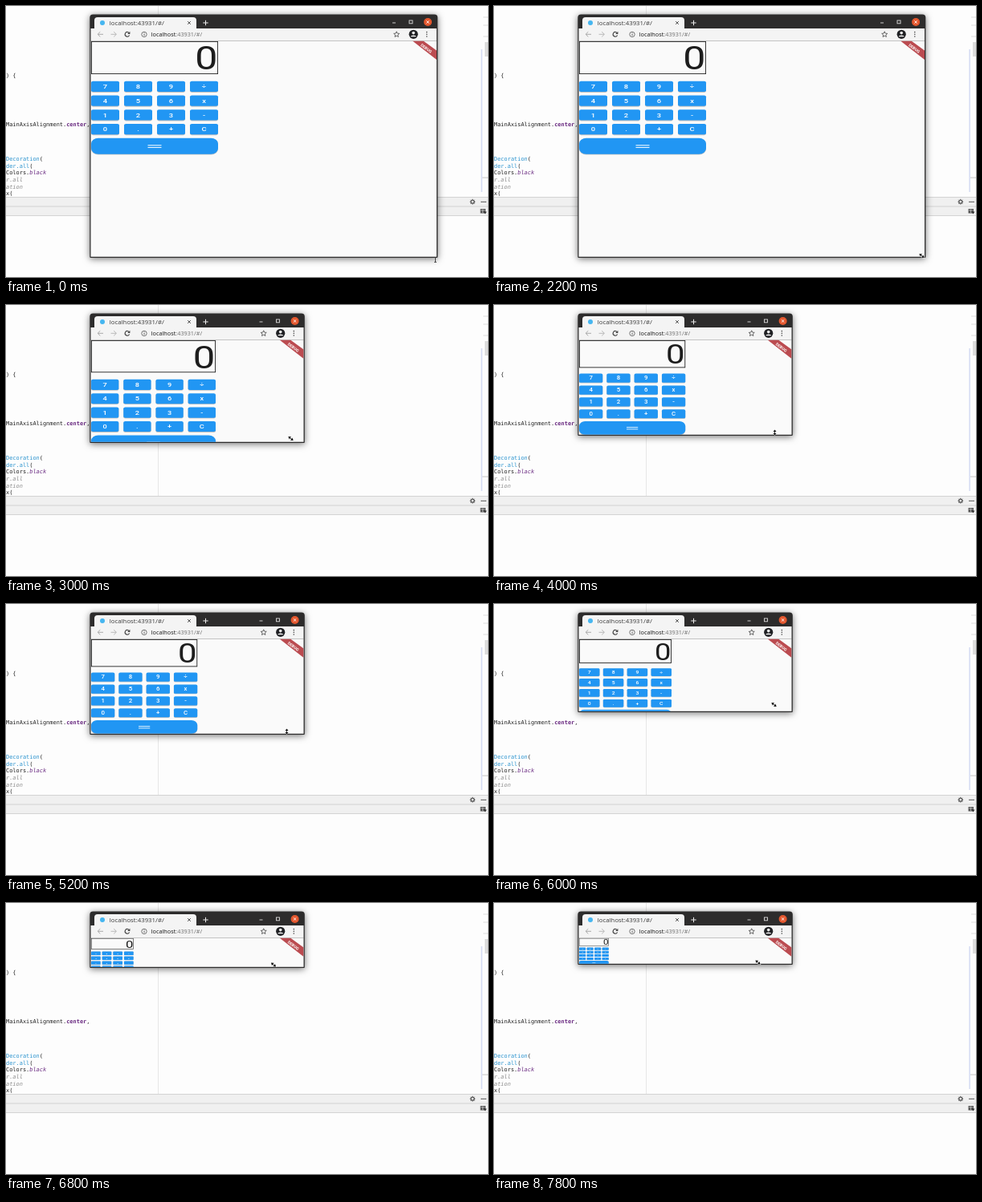
Recreate the animation shown at these times as an HTML page with a canvas. Size 600 px wide and 338 px high, loop 8000 ms.

```html
<!DOCTYPE html>
<html lang="en">
<head>
<meta charset="utf-8">
<title>Resizing a calculator window</title>
<style>
  html, body { margin: 0; width: 100%; height: 100%; overflow: hidden; background: #fdfdfd; }
  canvas { display: block; width: 100vw; height: 100vh; }
</style>
</head>
<body>
<canvas id="stage"></canvas>
<script>
const W = 600, H = 338, LOOP = 8000, STEP = 200;
const LEFT = 105, TOP = 11, BODY_TOP = 44;
const MONO = '"DejaVu Sans Mono", monospace';
const SANS = '"Noto Sans", "Open Sans", sans-serif';
const APP = 'Roboto, sans-serif';

// time, window right, window bottom, pointer x, pointer y
const KEYS = [
  [0, 537, 314, 534.5, 316.5],
  [800, 537, 314, 533, 313],
  [1200, 537, 314, 533, 313],
  [1800, 537, 314, 532.5, 311.5],
  [2200, 537, 314, 532.5, 311.5],
  [2400, 500, 284, 495, 281],
  [2600, 447, 234, 440, 230],
  [2800, 395, 183.3, 390, 179],
  [3000, 371.5, 172, 354.5, 166.5],
  [3200, 371.5, 165, 351, 161],
  [3400, 371.5, 163, 349.5, 159],
  [5600, 371.5, 163, 349.5, 159],
  [5800, 371.5, 147.6, 349, 140],
  [6000, 371.5, 135, 348.5, 125.5],
  [6600, 371.5, 92, 336, 85],
  [6800, 371.5, 81, 333, 77],
  [7800, 371.5, 77, 328.5, 74],
  [8000, 371.5, 77, 328.5, 74]
];
const POINTERS = [[0, 'beam'], [800, 'diagonal'], [3400, 'vertical'], [5600, 'diagonal']];
const LABELS = ['789÷', '456x', '123-', '0.+C'];

const canvas = document.getElementById('stage');
const ctx = canvas.getContext('2d');
const ratio = window.devicePixelRatio || 1;
canvas.width = W * ratio;
canvas.height = H * ratio;

function pose(t) {
  const i = Math.max(1, KEYS.findIndex(k => k[0] >= t));
  const a = KEYS[i - 1], b = KEYS[i];
  const p = (t - a[0]) / (b[0] - a[0]);
  const [, right, bottom, x, y] = a.map((v, n) => v + (b[n] - v) * p);
  return { right, bottom, x, y };
}

function rect(x, y, w, h, fill) {
  ctx.fillStyle = fill;
  ctx.fillRect(x, y, w, h);
}

function round(x, y, w, h, r, fill) {
  ctx.fillStyle = fill;
  ctx.beginPath();
  ctx.roundRect(x, y, w, h, r);
  ctx.fill();
}

function disc(x, y, r, fill) {
  ctx.fillStyle = fill;
  ctx.beginPath();
  ctx.arc(x, y, r, 0, 7);
  ctx.fill();
}

function ring(x, y, r, color, width = 0.9, from = 0, to = 7) {
  ctx.strokeStyle = color;
  ctx.lineWidth = width;
  ctx.beginPath();
  ctx.arc(x, y, r, from, to);
  ctx.stroke();
}

function line(points, color, width = 0.9) {
  ctx.strokeStyle = color;
  ctx.lineWidth = width;
  ctx.beginPath();
  points.forEach(([x, y]) => ctx.lineTo(x, y));
  ctx.stroke();
}

function poly(points, fill) {
  ctx.fillStyle = fill;
  ctx.beginPath();
  points.forEach(([x, y]) => ctx.lineTo(x, y));
  ctx.fill();
}

function cross(x, y, r, color, width) {
  line([[x - r, y - r], [x + r, y + r]], color, width);
  line([[x - r, y + r], [x + r, y - r]], color, width);
}

function text(str, x, y, font, color, align = 'left') {
  ctx.font = font;
  ctx.fillStyle = color;
  ctx.textAlign = align;
  ctx.fillText(str, x, y);
  return x + ctx.measureText(str).width;
}

function drawEditor() {
  rect(0, 0, W, H, '#fdfdfd');
  rect(189, 0, 1, 238, '#e6e6e6');

  const plain = '6.95px ' + MONO;
  const bold = 'bold ' + plain, italic = 'italic ' + plain;
  const ink = '#222', blue = '#2a93cf', purple = '#6b2c82', grey = '#8c8c8c';
  text(') {', 0, 89, plain, ink);
  let x = text('MainAxisAlignment.', 0, 149.7, plain, ink);
  x = text('center', x, 149.7, bold, purple);
  text(',', x, 149.7, plain, ink);
  x = text('Decoration', 0, 193, plain, blue);
  text('(', x, 193, plain, ink);
  x = text('der.all', 0, 201.6, plain, blue);
  text('(', x, 201.6, plain, ink);
  x = text('Colors.', 0, 210.3, plain, ink);
  text('black', x, 210.3, italic, purple);
  text('r.all', 0, 219, italic, grey);
  text('ation', 0, 227.6, italic, grey);
  text('x(', 0, 236.3, plain, ink);

  rect(591.5, 54, 1.2, 178, '#c9d2f0');
  rect(596, 45, 4, 18, '#dcdcdc');
  [14, 24, 38].forEach(y => rect(594, y - 0.5, 6, 1, '#dedede'));
  rect(593, 213.5, 7, 1.2, '#cfcfcf');

  rect(0, 238, W, 24, '#f0f0f0');
  [238, 249.5, 261].forEach(y => rect(0, y, W, 1, '#d3d3d3'));
  ring(580.8, 244.2, 2, '#555', 1.3);
  for (let a = 0; a < 6.2; a += Math.PI / 4) {
    const c = Math.cos(a), s = Math.sin(a);
    line([[580.8 + c * 2.3, 244.2 + s * 2.3], [580.8 + c * 3.4, 244.2 + s * 3.4]], '#555', 1);
  }
  rect(591, 243.8, 7, 1, '#555');
  rect(590.5, 253, 6.5, 5.5, '#555');
  rect(591, 254.6, 5.5, 0.6, '#ddd');
  rect(593.4, 253.6, 0.6, 4.5, '#ddd');
  poly([[594.5, 256.5], [598.5, 256.5], [596.5, 259.5]], '#333');
}

function drawFrame(right, bottom) {
  ctx.save();
  ctx.shadowColor = 'rgba(0,0,0,.55)';
  ctx.shadowBlur = 8 * ratio;
  ctx.shadowOffsetY = 1.5 * ratio;
  round(LEFT - 0.7, TOP - 0.5, right - LEFT + 1, bottom - TOP + 0.5, [4, 4, 1, 1], '#2d2c2c');
  ctx.restore();

  // tab strip
  round(110, 14, 127, 16, [4, 4, 0, 0], '#f4f4f4');
  disc(120, 21, 3, '#46b6f0');
  text('localhost:43931/#/', 128.7, 23.6, '7.8px ' + SANS, '#444');
  cross(228, 21, 1.9, '#444', 0.9);
  line([[245.3, 21], [251.7, 21]], '#eee', 1);
  line([[248.5, 17.8], [248.5, 24.2]], '#eee', 1);

  line([[right - 56, 21], [right - 52, 21]], '#ddd', 0.9);
  ctx.strokeStyle = '#ddd';
  ctx.lineWidth = 0.9;
  ctx.strokeRect(right - 35, 18, 4, 3.8);
  disc(right - 11.9, 20, 5, '#e4572e');
  cross(right - 11.9, 20, 1.7, '#fff', 0.9);

  // address bar
  rect(LEFT + 0.5, 28, right - LEFT - 1.5, 15.5, '#f4f4f4');
  const arrow = (x, dir, color) => {
    line([[x - dir * 3.5, 35.3], [x + dir * 3.2, 35.3]], color, 1);
    line([[x + dir * 0.2, 32.2], [x + dir * 3.4, 35.3], [x + dir * 0.2, 38.4]], color, 1);
  };
  arrow(117.5, -1, '#a9a9a9');
  arrow(134, 1, '#b9b9b9');
  ring(151, 35.3, 2.8, '#444', 1.1, 0.4, 5.6);
  poly([[154.4, 31.8], [154.4, 35], [151.2, 35]], '#444');
  ring(172, 35.4, 3.2, '#555', 0.8);
  rect(171.6, 34.9, 0.9, 2.2, '#555');
  rect(171.6, 33.4, 0.9, 0.9, '#555');
  const x = text('localhost', 180.7, 38, '7.25px ' + SANS, '#222');
  text(':43931/#/', x, 38, '7.25px ' + SANS, '#777');

  const star = [...Array(11).keys()].map(i => {
    const a = i * Math.PI / 5 - Math.PI / 2, r = i % 2 ? 1.7 : 3.7;
    return [right - 50.8 + Math.cos(a) * r, 35.5 + Math.sin(a) * r];
  });
  line(star, '#444', 0.8);
  const face = right - 29.8;
  disc(face, 35.3, 5.6, '#202124');
  disc(face, 33.6, 1.8, '#f4f4f4');
  ctx.beginPath();
  ctx.ellipse(face, 38.2, 3.3, 1.6, 0, Math.PI, 0);
  ctx.fill();
  [32.6, 35.3, 38].forEach(y => disc(right - 13.2, y, 0.8, '#444'));
}

// The calculator is laid out at full size and scaled as a whole;
// the recording is wider than the app's true proportions.
function drawCalculator(scale) {
  const wide = 1.25, w = 158 / wide;
  ctx.save();
  ctx.translate(LEFT + 1, BODY_TOP);
  ctx.scale(scale * wide, scale);

  rect(0, 0, w, 41, '#222');
  const edge = Math.min(1.6, 0.9 / scale);
  rect(edge / wide, edge, w - 2 * edge / wide, 41 - 2 * edge, '#fafafa');
  text('0', w - 0.6, 35.2, '40px ' + APP, '#1d1d1d', 'right');

  const key = (x, y, kw, kh, r) => {
    round(x, y + 0.8, kw, kh, r, 'rgba(0,0,0,.22)');
    round(x, y, kw, kh, r, '#2196f3');
  };
  LABELS.forEach((row, r) => [...row].forEach((label, c) => {
    const x = c * 41 / wide, y = 49.7 + r * 17.75;
    key(x, y, 35 / wide, 13.4, 1.8);
    text(label, x + 17.5 / wide, y + 9.4, '500 7.5px ' + APP, '#fff', 'center');
  }));
  key(0, 120.7, w, 20, 7);
  [129.2, 131.9].forEach(y => rect(70.5 / wide, y, 17 / wide, 1.1, '#e8f4fe'));
  ctx.restore();
}

function drawBanner(right) {
  const e = right - 1;
  poly([[e - 30, 43.5], [e - 16.5, 43.5], [e, 55.5], [e, 67]], '#bb4b50');
  ctx.save();
  ctx.translate(e - 12.8, 52.8);
  ctx.rotate(Math.atan(0.75));
  text('DEBUG', 0, 1.8, 'bold 5px ' + APP, '#fff', 'center');
  ctx.restore();
}

function drawPointer(kind, x, y) {
  ctx.save();
  ctx.translate(x, y);
  if (kind === 'beam') {
    line([[0, -3], [0, 3]], '#333', 0.9);
    line([[-1.5, -3], [1.5, -3]], '#333', 0.8);
    line([[-1.5, 3], [1.5, 3]], '#333', 0.8);
  } else {
    if (kind === 'diagonal') ctx.rotate(-0.9);
    const reach = kind === 'diagonal' ? 4 : 3.4;
    [1, -1].forEach(d => {
      const head = [[-2, d * 0.9], [2, d * 0.9], [0, d * reach], [-2, d * 0.9]];
      line(head, '#fff', 1);
      poly(head, '#111');
    });
    line([[0, -1], [0, 1]], '#111', 0.9);
  }
  ctx.restore();
}

function draw(time) {
  const t = Math.floor(time % LOOP / STEP) * STEP;
  const now = pose(t);
  // layout trails the window edge by one step
  const before = pose(Math.max(0, t - STEP));
  const scale = Math.min(1, (before.bottom - 45) / 141);

  ctx.setTransform(ratio, 0, 0, ratio, 0, 0);
  drawEditor();
  drawFrame(now.right, now.bottom);

  ctx.save();
  ctx.beginPath();
  ctx.rect(LEFT + 0.5, 43.5, now.right - LEFT - 1.5, now.bottom - 44.7);
  ctx.clip();
  rect(LEFT, 43, now.right - LEFT, now.bottom - 43, '#fafafa');
  drawCalculator(scale);
  drawBanner(now.right);
  ctx.restore();

  const [, kind] = POINTERS.filter(p => p[0] <= t).pop();
  drawPointer(kind, now.x, now.y);
}

const start = performance.now();
function tick() {
  draw(performance.now() - start);
  requestAnimationFrame(tick);
}
tick();
</script>
</body>
</html>
```
